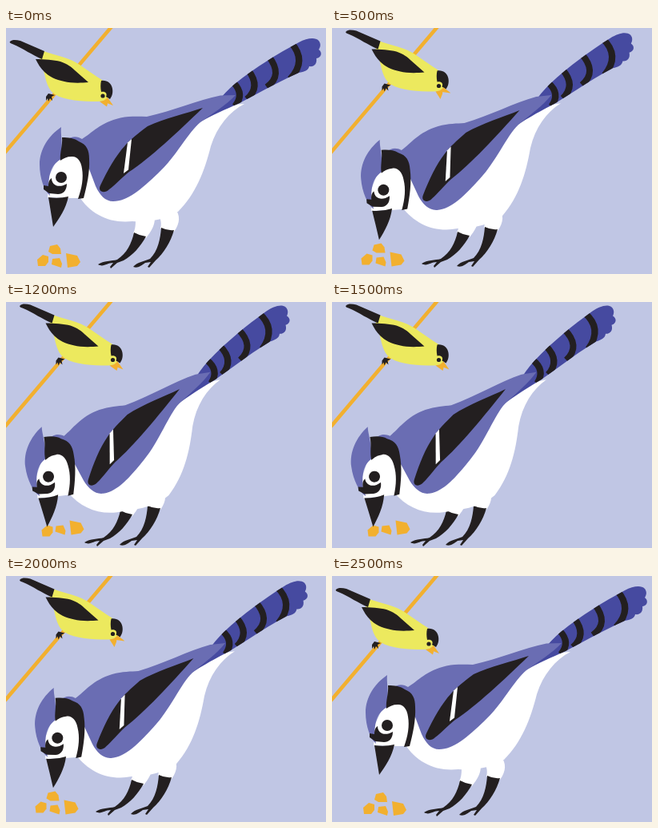
Write an HTML page that moves like this. It is 400 px wide and 308 px high and loops after 2.7 s.

```html
<!DOCTYPE html>
<html lang="en">
<head>
<meta charset="utf-8">
<title>Feeding birds</title>
<style>
  html, body { margin: 0; width: 100%; height: 100%; overflow: hidden; background: #c0c6e4; }
  svg { display: block; width: 100%; height: 100%; }
  .ink { fill: #231f20; }
  .white { fill: #fff; }
  .blue { fill: #6a6db3; }
  .navy { fill: #464aa0; }
  .gold { fill: #f2b02f; }
  .yellow { fill: #ece95e; }
  .stripes { fill: none; stroke: #231f20; stroke-width: 8; }
</style>
</head>
<body>
<svg viewBox="0 0 400 308">
  <defs>
    <clipPath id="tailClip"><use href="#tail"/></clipPath>
  </defs>
  <path d="M-4 159L134 -4" stroke="#f2b02f" stroke-width="4.600"/>

  <g id="finch">
    <path class="yellow" d="M47 29C60 34 80 37 92 46C102 53 112 60 120 65L132 80C130 87 125 92 115 92C95 92 74 91 61 83C49 74 50 60 45 47L42 39Z"/>
    <path class="ink" d="M5 17C8 14 13 15 18 16L48 29L45 39C33 34 22 26 8 20C5 19 4 18 5 17Z"/>
    <path class="ink" d="M37 39C48 39 60 40 68 42C77 45 82 49 86 53L103 68C93 69 80 69 73 67C62 65 53 60 48 55C43 50 40 45 37 39Z"/>
    <path class="ink" d="M119 66C126 65 132 69 133 76C134 82 132 86 130 89L125 86C127 82 124 79 119 80C118 75 118 70 119 66Z"/>
    <circle class="ink" cx="121" cy="85" r="2.600"/>
    <path class="ink" d="M53 82L61 84L57 86L58 91L55 88L53 92L52 88L50 91L50 86Z"/>
    <path id="upperBill" class="gold"/>
    <path id="lowerBill" class="gold"/>
  </g>

  <g id="seeds" class="gold">
    <path id="topSeed" d="M55 273L64 271L68 276L69 283L58 283L53 280Z"/>
    <path id="leftSeed" d="M39 290L46 284L53 286L53 293L49 298L40 298Z"/>
    <path d="M58 289L67 288L70 295L69 300L57 296Z"/>
    <path d="M75 282L89 285L93 293L89 298L77 300Z"/>
  </g>

  <g id="legs">
    <path class="white" d="M162 238H186C186 248 181 255 175 263L159 257C162 251 162 246 162 238ZM190 232L211 226C218 234 218 244 210 255L193 251C195 244 193 238 190 232Z"/>
    <path class="ink" d="M160 256Q167 260 175 261C168 274 158 285 147 291L139 294L131 301L130 299L134 294C126 294 122 300 115 296C122 291 132 292 139 290C151 282 157 270 160 256Z"/>
    <path class="ink" d="M194 250Q202 254 210 253C206 268 197 282 187 291L179 300L177 299L181 293L174 294C168 298 165 301 159 299C164 293 173 292 180 289C190 279 193 264 194 250Z"/>
  </g>

  <g id="jay">
    <path class="white" d="M298 95C279 105 264 123 256 148C248 180 237 208 215 230C200 240 178 243 158 242C130 245 106 234 90 209L75 180L110 140L240 100Z"/>
    <path id="tail" class="navy" d="M240 119C256 104 270 83 286 70C312 49 340 32 366 18C376 13 386 11 391 16C394 20 393 24 391 27C396 31 394 37 388 38C389 45 385 49 379 48C378 53 373 55 366 56C350 63 335 71 320 79L292 94C274 102 258 109 240 119Z"/>
    <path class="stripes" clip-path="url(#tailClip)" d="M284 68Q299 83 286 98M303 53Q319 74 301 89M328 35Q347 59 326 74M356 18Q377 41 355 64"/>
    <path class="blue" d="M75 141C83 134 90 136 95 139C107 132 118 118 143 112.500C156 110 167 111 176 111C208 104 240 90 268 84.500L287 84C275 97 258 107 243 118C228 130 212 162 190 182C170 201 152 217 134 217C124 217 117 209 112 198L103 174L90 155Z"/>
    <path class="ink" d="M246 100C225 107 198 113 177 123C165 132 155 140 149 147C137 160 127 178 118 197C114 205 123 208 129 202C136 197 145 187 154 180C180 163 215 130 246 100Z"/>
    <path class="white" d="M152 143.500L157 139L153 177.500L147 182Z"/>

    <path class="white" d="M66 160L85 155L98 170L97 213L77 213L52 212L54 185Z"/>
    <path class="blue" d="M69 124C68 133 71 142 69 164C59 170 54 178 53 198L55 210C48 204 42 188 42 171C42 152 53 135 69 124Z"/>
    <path class="ink" d="M70 137C78 137 86 138 91 142C101 146 104 153 104 164C105 180 101 198 97 213L90 214C95 200 97 188 95 176C94 166 88 160 82 161C76 161 72 163 68 166C67 156 71 147 70 137Z"/>
    <circle class="ink" cx="69" cy="187" r="7"/>
    <path class="ink" d="M47 197L53 198C53 193 54 190 57 188C57 197 66 201 76 195C76 204 71 208 65 208L54 207L47 202Z"/>
    <path class="ink" d="M53 212Q66 214 78 211C75 226 67 238 59 249C57 236 55 224 53 212Z"/>
  </g>
</svg>
<script>
const byId = id => document.getElementById(id);
const place = (id, [x, y]) => byId(id).setAttribute("transform", `translate(${x} ${y})`);

// The jay turns about its wing tip; all other parts shift from the upright pose.
const poses = {
  upright: { wing: [246, 100], tilt: 0, legs: [0, 0], seeds: [0, 0], topSeed: [0, 0], leftSeed: [0, 0], finch: [0, 0], gape: 0 },
  leaning: { wing: [234.5, 103], tilt: -4.2, legs: [-3, -1], seeds: [-2.5, -1.5], topSeed: [0, 0], leftSeed: [0, 0], finch: [12.5, -12.5], gape: 3 },
  pecking: { wing: [227.5, 104.5], tilt: -5.3, legs: [-17, 5], seeds: [4.5, -8], topSeed: [-13, 2], leftSeed: [1, 4], finch: [-3, 5.5], gape: 3 },
  eating: { wing: [217, 109], tilt: -7.6, legs: [-17, 5], seeds: [4.5, -8.5], topSeed: null, leftSeed: [1, 4], finch: [12.5, -12.5], gape: 0 }
};
const timeline = [
  [500, "upright"], [800, "leaning"], [1200, "pecking"], [1700, "eating"],
  [2000, "pecking"], [2200, "leaning"], [2700, "upright"]
];

function show({ wing, tilt, legs, seeds, topSeed, leftSeed, finch, gape }) {
  byId("jay").setAttribute("transform", `translate(${wing}) rotate(${tilt}) translate(-246 -100)`);
  place("legs", legs);
  place("seeds", seeds);
  place("leftSeed", leftSeed);
  place("finch", finch);
  byId("topSeed").style.display = topSeed ? "" : "none";
  if (topSeed) place("topSeed", topSeed);
  byId("upperBill").setAttribute("d", `M127 87L${134 + gape * 0.7} ${97 - gape}L121 92Z`);
  byId("lowerBill").setAttribute("d", `M117 92L126 90L${127 - gape / 2} 95L${126 - gape} ${98.5 + gape}Z`);
}

let current;
function frame() {
  const time = performance.now() % 2700;
  const name = timeline.find(([end]) => time < end)[1];
  if (name !== current) show(poses[current = name]);
  requestAnimationFrame(frame);
}
frame();
</script>
</body>
</html>
```
